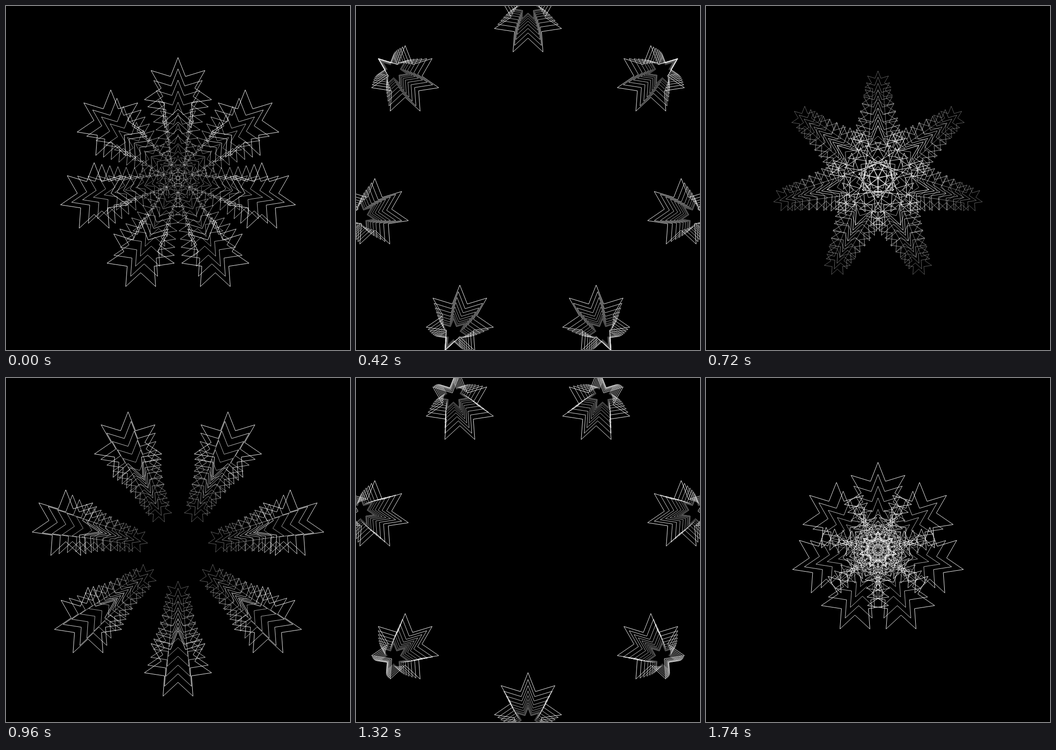
An HTML page with a canvas for the animation above (1.8 s loop, 748 px wide and 748 px high).

```html
<!DOCTYPE html>
<html lang="en">
<head>
<meta charset="utf-8">
<title>Star trails</title>
<style>
  html, body { margin: 0; width: 100%; height: 100%; overflow: hidden; background: #000; }
  canvas { display: block; width: 748px; height: 748px; }
</style>
</head>
<body>
<canvas id="stage" width="748" height="748"></canvas>
<script>
  const SIZE = 748, HALF = SIZE / 2;
  const LOOP = 1800, STEP = 60;
  const ARMS = 7, POINTS = 7, COPIES = 10;
  const RADIUS = 75, SHRINK = 0.9;
  const LAG = 3, START_PHASE = 30; // degrees
  const rad = deg => deg * Math.PI / 180;

  const ctx = document.getElementById('stage').getContext('2d');
  ctx.strokeStyle = '#fff';
  ctx.lineJoin = 'round';

  const star = new Path2D();
  for (let i = 0; i < POINTS * 2; i++) {
    const a = Math.PI * i / POINTS - Math.PI / 2;
    const r = i % 2 ? RADIUS / 2 : RADIUS;
    star.lineTo(r * Math.cos(a), r * Math.sin(a));
  }
  star.closePath();

  // The scale also thins the stroke, so the trail fades out.
  function drawStar(x, y, scale) {
    ctx.setTransform(scale, 0, 0, scale, HALF + x, HALF + y);
    ctx.lineWidth = 1;
    ctx.stroke(star);
  }

  function draw(time) {
    const held = Math.floor((time % LOOP) / STEP) * STEP;
    const phase = START_PHASE + 360 * held / LOOP;
    ctx.setTransform(1, 0, 0, 1, 0, 0);
    ctx.fillStyle = '#000';
    ctx.fillRect(0, 0, SIZE, SIZE);
    for (let k = COPIES - 1; k >= 0; k--) {
      const dist = HALF * Math.sin(rad(phase - k * LAG));
      for (let arm = 0; arm < ARMS; arm++) {
        const a = rad(360 * arm / ARMS - 90);
        drawStar(dist * Math.cos(a), dist * Math.sin(a), SHRINK ** k);
      }
    }
  }

  const start = performance.now();
  function tick() {
    draw(performance.now() - start);
    requestAnimationFrame(tick);
  }
  tick();
</script>
</body>
</html>
```
